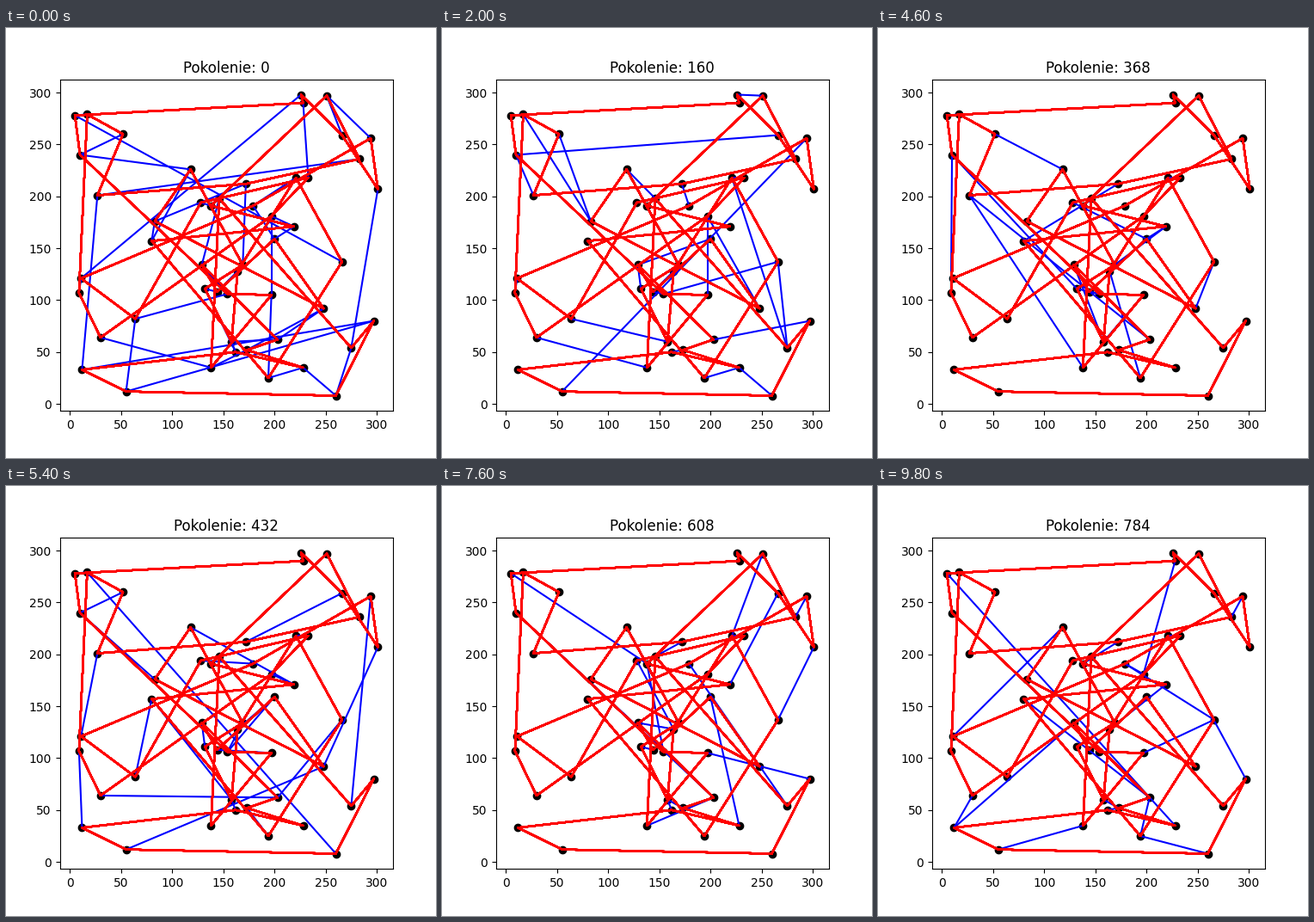
Write a matplotlib script that moves like this. It is 500 px wide and 500 px high and loops after 10000 ms.

```python
import itertools
import math
import random

import matplotlib.pyplot as plt
from matplotlib.animation import FuncAnimation
from matplotlib.collections import LineCollection

FRAMES, INTERVAL, STEP = 50, 200, 16

# Cities, listed in the order the best tour visits them.
CITIES = [
    (5, 278), (10, 240), (154, 106), (197, 105), (138, 35),
    (146, 198), (275, 54), (297, 80), (260, 8), (55, 12),
    (12, 33), (162, 50), (228, 35), (173, 52), (203, 62),
    (129, 134), (144, 108), (200, 159), (248, 92), (83, 176),
    (118, 226), (169, 134), (132, 111), (158, 60), (164, 128),
    (221, 218), (266, 137), (194, 25), (80, 157), (219, 171),
    (138, 191), (251, 297), (283, 236), (172, 212), (27, 201),
    (52, 260), (17, 279), (9, 107), (30, 64), (197, 181),
    (233, 218), (128, 194), (64, 82), (11, 121), (179, 191),
    (294, 256), (301, 207), (266, 259), (226, 298), (228, 290),
]
N = len(CITIES)
BEST = [(k, (k + 1) % N) for k in range(N)]
PAIRS = list(itertools.combinations(range(N), 2))


def length(edge):
    a, b = edge
    return math.dist(CITIES[a], CITIES[b])


def current_tour(i):
    """Closed tour that shares more edges with the best one as time goes on."""
    rng = random.Random(i)
    keep = 0.55 - 0.4 * math.exp(-i / 12)
    inherited = [e for e in BEST if rng.random() < keep]
    fillers = sorted(PAIRS, key=lambda e: length(e) * rng.uniform(0.05, 1))

    degree, group, edges = [0] * N, list(range(N)), []
    for a, b in inherited + fillers:
        if max(degree[a], degree[b]) < 2 and group[a] != group[b]:
            old, new = group[a], group[b]
            group = [new if g == old else g for g in group]
            degree[a] += 1
            degree[b] += 1
            edges.append((a, b))
    edges.append(tuple(k for k in range(N) if degree[k] == 1))
    return edges


fig, ax = plt.subplots(figsize=(5, 5), dpi=100)
xs, ys = zip(*CITIES)
ax.scatter(xs, ys, color="black", zorder=1)
blue = LineCollection([], colors="blue", linewidths=1.5, zorder=1.5)
ax.add_collection(blue, autolim=False)
# Overlaid strokes harden the edges of the best tour.
for _ in range(40):
    ax.plot(xs + xs[:1], ys + ys[:1], color="red", lw=1.5, zorder=2)


def draw(i):
    blue.set_segments([[CITIES[a], CITIES[b]] for a, b in current_tour(i)])
    ax.set_title(f"Pokolenie: {STEP * i}")
    return [blue, ax.title]


anim = FuncAnimation(fig, draw, frames=FRAMES, interval=INTERVAL, repeat=True)
plt.show()
```
